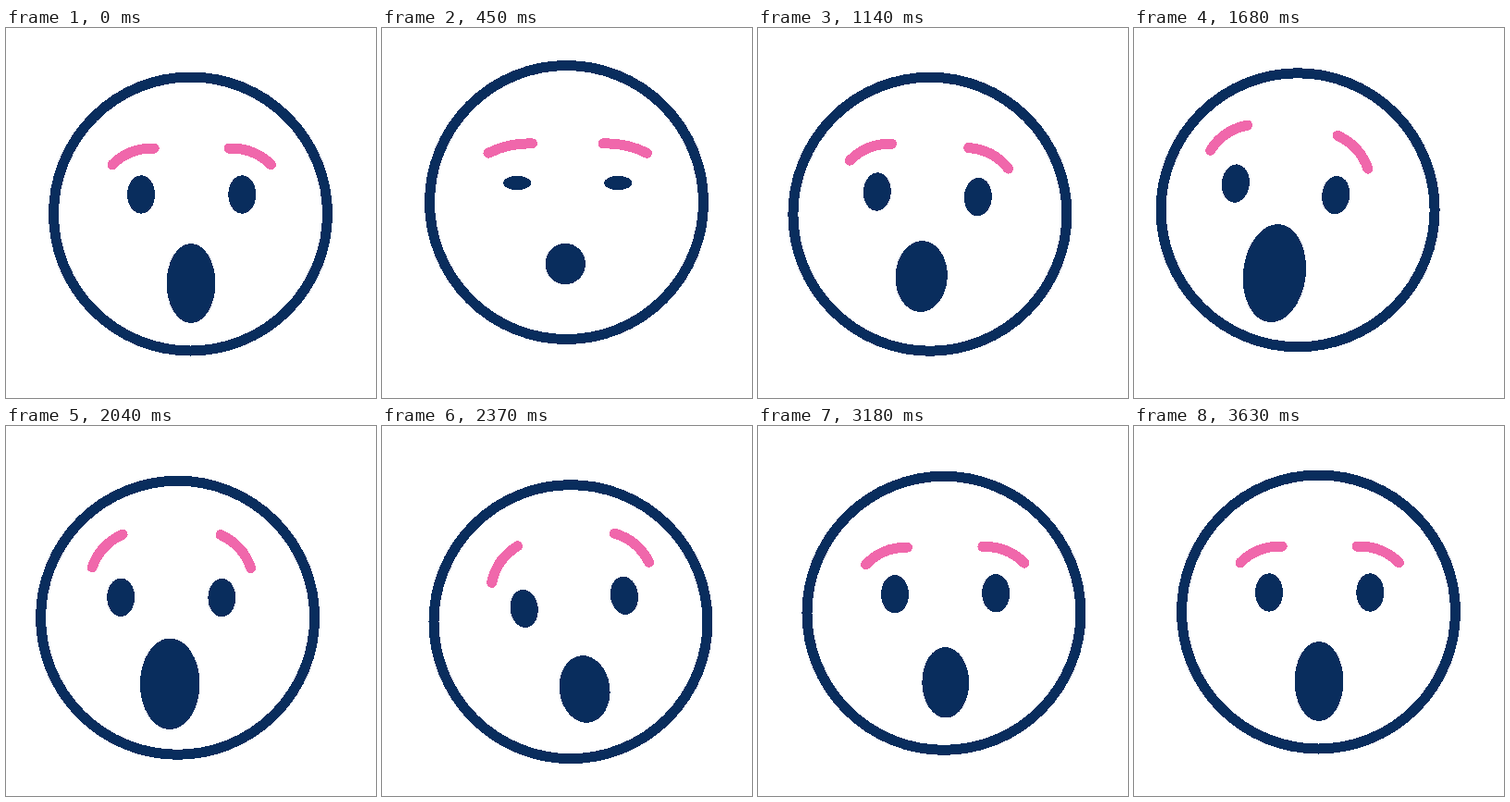
These frames come from a looping animation (400x400 px, 3660 ms). An HTML page:

```html
<!DOCTYPE html>
<html lang="en">
<head>
<meta charset="utf-8">
<title>Surprised face</title>
<style>
  html, body { margin: 0; width: 100%; height: 100%; overflow: hidden; background: #fff; }
  svg { display: block; width: 100vw; height: 100vh; }
</style>
</head>
<body>
<svg viewBox="0 0 400 400" shape-rendering="crispEdges">
  <g fill="none" stroke-width="11" stroke-linecap="round">
    <circle id="head" r="148" stroke="#092d5d"/>
    <g id="face">
      <g fill="#092d5d" stroke="none">
        <ellipse class="eye" cx="-54.6" rx="15"/>
        <ellipse class="eye" cx="54.6" rx="15"/>
        <ellipse id="mouth"/>
      </g>
      <g stroke="#f067ab">
        <path class="brow"/>
        <path class="brow"/>
      </g>
    </g>
  </g>
</svg>
<script>
const LOOP = 3660, STEP = 30;

// Smooth step from 0 at time a to 1 at time b.
function ease(t, a, b) {
  const u = Math.min(1, Math.max(0, (t - a) / (b - a)));
  return (1 - Math.cos(Math.PI * u)) / 2;
}

// Eased moves through a value and then [time, value] turning points.
function glide(t, value, ...points) {
  let from = 0, result = value;
  for (const [time, next] of points) {
    result += (next - value) * ease(t, from, time);
    value = next;
    from = time;
  }
  return result;
}

// Look to the left during a..b, to the right during c..d, then back to rest.
function glance(t, left, right, a, b, c, d) {
  return left * ease(t, a, b) + (right - left) * ease(t, c, d) - right * ease(t, 2880, 3240);
}

// The mouth closes, opens wide, closes again and relaxes.
function gasp(t, rest, small, wide) {
  return glide(t, rest, [480, small], [1760, wide], [2920, small], [3300, rest]);
}

// Hop, settle, then ride with each glance and rebound.
function bounce(t) {
  return glide(t, 201, [210, 220.5], [460, 188.4], [1100, 201.3], [1650, 196.7],
    [2290, 212.5], [2870, 193.8], [3210, 202.5], [3400, 197.5], [3600, 201]);
}

const head = document.getElementById("head");
const face = document.getElementById("face");
const mouth = document.getElementById("mouth");
const eyes = document.querySelectorAll(".eye");
const brows = document.querySelectorAll(".brow");

function set(el, attrs) {
  for (const name in attrs) el.setAttribute(name, attrs[name]);
}

function draw(t) {
  const x = 199.5 + glance(t, -22.4, 22, 665, 1500, 1700, 2880);
  const y = bounce(t);
  const turn = glance(t, 6.6, -7.9, 720, 1620, 1680, 2460);
  const shift = glance(t, -14.3, 6, 860, 1680, 1690, 2620);
  const blink = ease(t, 240, 450) - ease(t, 450, 660);
  const lift = glide(t, 21.2, [420, 12.3], [2230, 48.5], [3300, 21.2]);
  const raise = ease(t, 0, 450) - ease(t, 450, 3000);

  set(head, { cx: x, cy: y });
  set(face, {
    transform: `translate(${x + 1.2 + shift} ${y - 21 - Math.abs(shift) / 10}) rotate(${turn})`
  });
  set(mouth, {
    cx: -0.7 - 1.7 * raise,
    cy: 96 - 8.5 * raise,
    rx: gasp(t, 26.5, 21.6, 34),
    ry: gasp(t, 43, 22, 53.5)
  });
  eyes.forEach(eye => set(eye, { ry: 20.7 - 13 * blink }));

  const bend = 10.5 * Math.min(1, lift / 21);
  brows.forEach((brow, i) => set(brow, {
    d: `M0 0Q24 ${-bend} 48.5 0`,
    transform: `scale(${i ? -1 : 1} 1) translate(-85.7 -32.3) rotate(${-lift})`
  }));
}

const start = performance.now();
function tick() {
  const t = (performance.now() - start) % LOOP;
  draw(Math.floor(t / STEP) * STEP);
  requestAnimationFrame(tick);
}
draw(0);
requestAnimationFrame(tick);
</script>
</body>
</html>
```
